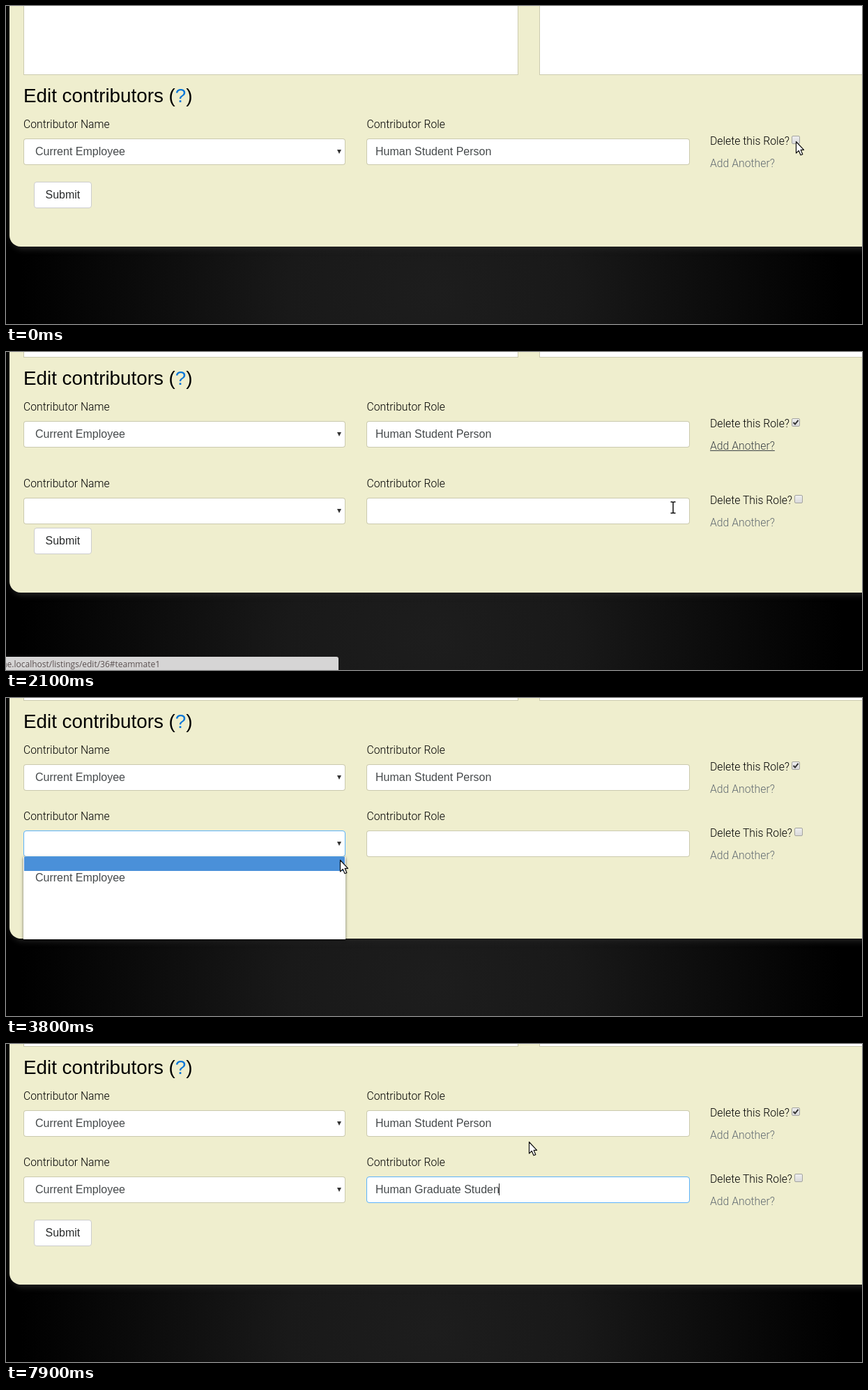
Recreate the animation shown at these times as an HTML page. Size 1228 by 456 pixels, loop 8 s.

```html
<!DOCTYPE html>
<html lang="en">
<head>
<meta charset="utf-8">
<title>Edit contributors</title>
<style>
  html, body { margin: 0; width: 100%; height: 100%; overflow: hidden; background: #000; }
  #stage { position: relative; width: 1228px; height: 456px; overflow: hidden;
    font: 16px/20px "Liberation Sans", Arial, sans-serif;
    background: radial-gradient(ellipse 590px 480px at 610px 410px, #1d1d1d, #191919 35%, #000); }
  #stage div, #cursor { position: absolute; box-sizing: border-box; white-space: pre; }
  #panel { left: 5px; top: -40px; width: 1300px; height: 385px; border-radius: 16px;
    background: #efeece; box-shadow: 3px 4px 8px #222; }
  #clip { left: 0; top: 0; width: 1228px; height: 252px; overflow: hidden; }
  #page { left: 0; top: 0; width: 1228px; height: 400px; }
  .field, .area { background: #fff padding-box; border: 1px solid rgba(0, 0, 0, .15); }
  .area { top: -200px; height: 299px; width: 710px; }
  .field { top: 32px; height: 38px; border-radius: 4px; padding: 8px 12px; color: #464a4c; }
  .field.focus { border-color: #5cb3fd; }
  .name { left: 25px; width: 462px; padding-left: 16px; }
  .name::after { content: ""; position: absolute; left: 449px; top: 15px;
    border: solid transparent; border-width: 6px 3.5px 0; border-top-color: #333; }
  .role { left: 517px; width: 464px; }
  h2 { position: absolute; left: 25px; top: 113px; margin: 0; font: 27.8px/31px "Liberation Sans", Arial, sans-serif; white-space: pre; }
  h2 span { color: #0275d8; }
  .row { left: 0; width: 1228px; height: 94px; }
  .label { top: 0; font: 300 15.75px/24px Roboto, sans-serif; color: #000; }
  .question { left: 1010px; top: 24px; }
  .link { left: 1010px; top: 56px; color: #636c72; }
  .link.hover { color: #3f4548; text-decoration: underline; }
  .box { top: 28px; width: 12px; height: 12px; border: 1px solid #a4a4a0; border-radius: 2px;
    background: linear-gradient(#eee, #dadada); }
  .box svg { position: absolute; left: 0; top: 0; }
  #submit { left: 40px; top: 252px; width: 83px; height: 38px; padding: 8px 15.5px;
    border: 1px solid #ccc; border-radius: 4px; background: #fff; color: #292b2c; }
  #popup { left: 25px; top: 228px; width: 462px; height: 118px; color: #464a4c;
    box-shadow: 0 1px 4px rgba(0, 0, 0, .55); }
  #popup.open { background: #fff; }
  #popup div { left: 1px; width: 460px; height: 20px; padding-left: 16px; visibility: hidden; }
  #popup.open div { visibility: inherit; }
  #popup .on { background: #4a90d9; color: #fff; }
  #status { left: 0; top: 437px; width: 477px; height: 19px; background: #d6d5d5; border-radius: 0 3px 0 0; overflow: hidden; }
  #status div { right: 256px; top: 1px; font: 12px/20px "Open Sans", "Noto Sans", sans-serif; color: #5a5050; }
  #caret { display: inline-block; width: 1px; height: 17px; margin: 0 -1px 0 -.5px; background: #222; vertical-align: -3px; }
  #cursor { left: 0; top: 0; overflow: visible; }
  #cursor path { stroke-linejoin: round; }
</style>
</head>
<body>
<div id="stage">
  <div id="panel"></div>
  <div id="clip"><div id="page">
    <div class="area" style="left:25px"></div>
    <div class="area" style="left:765px"></div>
    <h2>Edit contributors (<span>?</span>)</h2>
  </div></div>
  <div id="submit">Submit</div>
  <div id="popup"><div style="top:0"></div><div style="top:20px">Current Employee</div></div>
  <div id="status"><div>ne.localhost/listings/edit/36#teammate1</div></div>
  <svg id="cursor" width="1" height="1">
    <path id="arrow" d="M.5 .5V17L4.3 13.4L7 19.8L9.8 18.6L7.1 12.3H11.6Z" fill="#fff" stroke="#111" stroke-width="1.2"/>
    <path id="hand" d="M-1.5 9V1.5Q-1.5 0 0 0T1.5 1.5V6Q3 4.8 4 6.5Q6 5.5 6.7 7.3Q9.3 6.7 9.3 9V12L8 16H-.5L-4.5 10Q-4.5 7.5-1.5 9ZM4 6.5V9M6.7 7.3V9.5" fill="#fff" stroke="#111" stroke-width="1.2"/>
    <g id="beam" fill="none">
      <path d="M-3.5-8H-1L0-7L1-8H3.5M0-7V7M-3.5 8H-1L0 7L1 8H3.5" stroke="#fff" stroke-width="3.4"/>
      <path d="M-3.5-8H-1L0-7L1-8H3.5M0-7V7M-3.5 8H-1L0 7L1 8H3.5" stroke="#111" stroke-width="1.5"/>
    </g>
  </svg>
</div>
<script>
const $ = id => document.getElementById(id);
const show = (el, on) => el.style.visibility = on ? "inherit" : "hidden";

function addRow(question, boxX, name, role) {
  const row = document.createElement("div");
  row.className = "row";
  row.innerHTML = `
    <div class="label" style="left:25px">Contributor Name</div>
    <div class="label" style="left:517.5px">Contributor Role</div>
    <div class="field name">${name}</div>
    <div class="field role"><span>${role}</span></div>
    <div class="label question">${question}</div>
    <div class="box" style="left:${boxX}px"><svg width="10" height="10"><path
      d="M1.5 5L4 7.5L8.5 1.8" fill="none" stroke="#333" stroke-width="2"/></svg></div>
    <div class="label link">Add Another?</div>`;
  $("page").append(row);
  const find = q => row.querySelector(q);
  return { el: row, name: find(".name"), role: find(".role"), text: find(".role span"),
    check: find("svg"), link: find(".link") };
}

const first = addRow("Delete this Role?", 1127, "Current Employee", "Human Student Person");
const second = addRow("Delete This Role?", 1131, "", "");
const rowTop = 158, rowGap = 95, slideMargin = 15;
first.el.style.top = rowTop + "px";
show(second.check, false);
const caret = document.createElement("span");
caret.id = "caret";
second.role.append(caret);

// [ms, x, y] of the pointer's hot spot
const path = [[0, 1133, 194], [200, 1133, 194], [300, 1135, 191], [1100, 1135, 191],
  [1600, 1049, 218], [1900, 1049, 218], [2100, 957, 223], [2900, 483, 210], [3300, 479, 228],
  [3400, 479, 228], [3600, 478, 231], [3700, 478, 231], [3800, 479, 232], [3900, 479, 232],
  [4300, 471, 248], [4500, 471, 248], [4900, 719, 207], [5100, 719, 207], [5300, 750, 140],
  [8000, 750, 140]];

// [ms, letters typed]
const typing = [[5900, 1], [6100, 2], [6300, 3], [6400, 4], [6500, 5], [6600, 7], [6800, 9],
  [7000, 10], [7100, 11], [7200, 12], [7300, 14], [7400, 16], [7600, 17], [7700, 18],
  [7800, 19], [7900, 21]];

function pointerAt(t) {
  const i = path.findIndex(k => k[0] > t);
  const [t0, x0, y0] = path[i - 1], [t1, x1, y1] = path[i];
  const p = (t - t0) / (t1 - t0);
  return [Math.round(x0 + (x1 - x0) * p), Math.round(y0 + (y1 - y0) * p)];
}

function draw(t) {
  // The new row slides open, then its extra margin collapses.
  const p = t < 2000 ? 0 : Math.min(1, (t - 1755) / 400);
  const scroll = Math.round(rowGap * (0.5 - Math.cos(p * Math.PI) / 2));
  $("page").style.top = -scroll + "px";
  second.el.style.top = rowTop + rowGap + (p < 1 ? slideMargin : 0) + "px";
  show(second.el, p > 0);

  show(first.check, t >= 1000);
  first.link.classList.toggle("hover", t >= 1600 && t < 3000);
  show($("status"), t >= 1600 && t < 2300);

  const [x, y] = pointerAt(t);
  const onLink = t >= 1600 && t < 2000;
  const onRole = p > 0 && x > 517 && x < 981 && y > 190 && y < 228;
  $("cursor").style.transform = `translate(${x}px, ${y}px)`;
  show($("hand"), onLink);
  show($("beam"), onRole);
  show($("arrow"), !onLink && !onRole);

  const popup = $("popup");
  show(popup, t >= 2900 && t < 4500);
  popup.classList.toggle("open", t >= 3000);
  [...popup.children].forEach((row, i) => row.classList.toggle("on", i === +(y >= 248)));

  second.name.textContent = t >= 4500 ? "Current Employee" : "";
  second.name.classList.toggle("focus", t >= 3000 && t < 5100);
  second.role.classList.toggle("focus", t >= 5100);
  const typed = typing.reduce((n, [at, count]) => t >= at ? count : n, 0);
  second.text.textContent = "Human Graduate Student".slice(0, typed);
  show(caret, t >= 5100 && t < 5700 || t >= 5900);
}

const start = performance.now();
function tick() {
  const t = (performance.now() - start) % 8000;
  draw(Math.floor(t / 100) * 100);
  requestAnimationFrame(tick);
}
tick();
</script>
</body>
</html>
```
